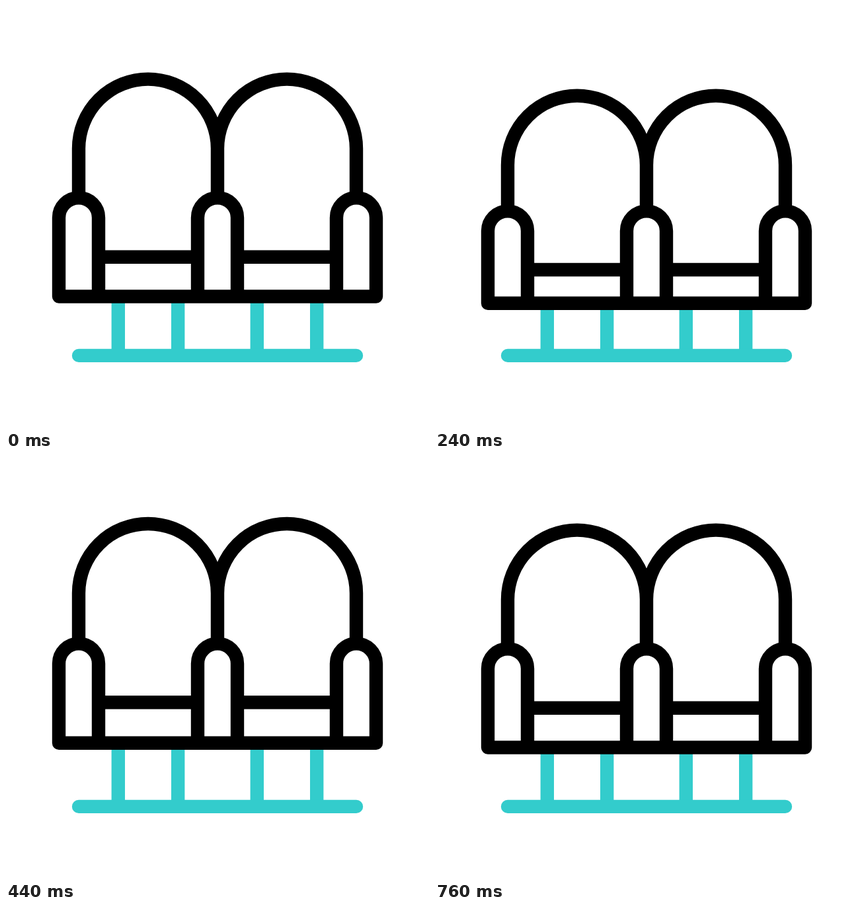
Animation, 640 px wide and 640 px high, one loop 1480 ms. Source, as an HTML page:

```html
<!DOCTYPE html>
<html lang="en">
<head>
<meta charset="utf-8">
<title>Cinema seats</title>
<style>
  html, body { margin: 0; width: 100%; height: 100%; overflow: hidden; background: #fff; }
  svg { display: block; width: 100vw; height: 100vh; }
  path { fill: none; stroke: #000; stroke-width: 20.4; stroke-linejoin: round; }
  .teal { stroke: #33cccc; }
</style>
</head>
<body>
<svg viewBox="0 0 640 640">
  <path id="legs" class="teal"/>
  <path class="teal" d="M110 528.9H530" stroke-linecap="round"/>
  <path id="backs"/>
  <path id="seats"/>
  <path id="arms"/>
</svg>
<script>
const LOOP = 1480, STEP = 40;
const TIMES = [80, 280, 480, 640];

// rest height, lowest and highest offset of each part
const PARTS = {
  back: [215.6, 28, -14],
  arm: [320.3, 22.4, -11.4],
  seat: [379.7, 21.6, -11.9],
  base: [439.5, 11.4, -8.9]
};

const smooth = p => p * p * (3 - 2 * p);

function height([rest, low, high], t) {
  const offsets = [0, low, high, 0];
  if (t <= TIMES[0] || t >= TIMES[3]) return rest;
  const i = t < TIMES[1] ? 0 : t < TIMES[2] ? 1 : 2;
  const p = (t - TIMES[i]) / (TIMES[i + 1] - TIMES[i]);
  return rest + offsets[i] + (offsets[i + 1] - offsets[i]) * smooth(p);
}

const shape = (id, d) => document.getElementById(id).setAttribute("d", d);

function draw(t) {
  const back = height(PARTS.back, t), arm = height(PARTS.arm, t);
  const seat = height(PARTS.seat, t), base = height(PARTS.base, t);
  const join = arm - 30;

  shape("legs", [169.8, 260.2, 379.8, 470.2].map(x => `M${x} ${base}V528`).join(""));
  shape("backs", [110, 320].map(x =>
    `M${x} ${join}V${back}a105 105 0 0 1 210 0V${join}`).join(""));
  shape("seats", [140, 350].map(x => `M${x} ${seat}h150`).join(""));
  shape("arms", `M80 ${base}H560` + [80, 290, 500].map(x =>
    `M${x} ${base}V${arm}a30 30 0 0 1 60 0V${base}Z`).join(""));
}

const start = performance.now();
function tick() {
  const t = (performance.now() - start) % LOOP;
  draw(Math.floor(t / STEP) * STEP);
  requestAnimationFrame(tick);
}
tick();
</script>
</body>
</html>
```
